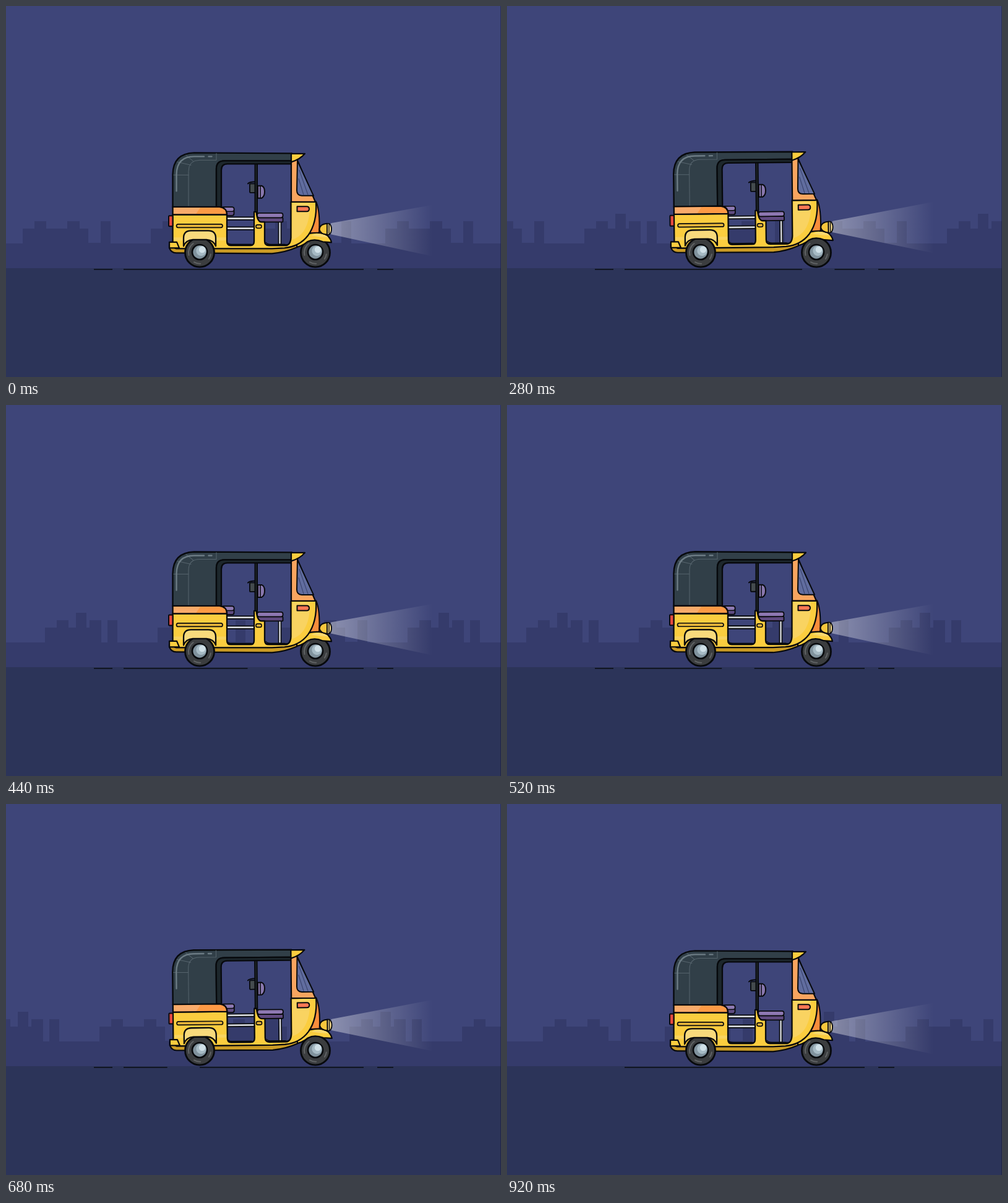
Animation, 800 px wide and 600 px high, one loop 0.96 s. Source, as an HTML page with a canvas:

```html
<!DOCTYPE html>
<html lang="en">
<head>
<meta charset="utf-8">
<title>Night rickshaw</title>
<style>
html, body { margin: 0; width: 100%; height: 100%; overflow: hidden; background: #3e4579; }
canvas { display: block; }
</style>
</head>
<body>
<canvas id="stage" width="800" height="600"></canvas>
<script>
const ctx = document.getElementById('stage').getContext('2d');
const LOOP = 960, STEP = 40, SWING = 500;
const INK = '#07090c', YELLOW = '#fbcd3f', PALE = '#f8da7c', ORANGE = '#fd9a45';
const CITY_PERIOD = 586;

// Blocks as [x, width, top], relative to the start of each cluster.
const wideCluster = [[0, 106, 360], [19, 19, 348], [72, 20, 348], [106, 20, 383], [126, 16, 348]];
const tallCluster = [[0, 91, 360], [19, 19, 348], [50, 17, 336], [72, 19, 348], [101, 16, 348]];
const clusters = [[27, wideCluster], [234, tallCluster], [416, wideCluster]];

function shape(d, fill, line = 0, ink = INK) {
  const path = new Path2D(d);
  if (fill) { ctx.fillStyle = fill; ctx.fill(path); }
  if (line) { ctx.strokeStyle = ink; ctx.lineWidth = line; ctx.stroke(path); }
}

function box(x, y, w, h, r, fill, line = 0) {
  ctx.beginPath();
  ctx.roundRect(x, y, w, h, r);
  ctx.fillStyle = fill;
  ctx.fill();
  if (line) { ctx.strokeStyle = INK; ctx.lineWidth = line; ctx.stroke(); }
}

function disc(x, y, r, fill, line = 0) {
  ctx.beginPath();
  ctx.arc(x, y, r, 0, Math.PI * 2);
  ctx.fillStyle = fill;
  ctx.fill();
  if (line) { ctx.strokeStyle = INK; ctx.lineWidth = line; ctx.stroke(); }
}

function across(x0, x1, ...stops) {
  const g = ctx.createLinearGradient(x0, 0, x1, 0);
  for (const [at, color] of stops) g.addColorStop(at, color);
  return g;
}

function backdrop(t) {
  ctx.fillStyle = '#3e4579';
  ctx.fillRect(0, 0, 800, 600);
  ctx.fillStyle = '#353b6b';
  ctx.fillRect(0, 384, 800, 40);
  const shift = t * 0.3895;
  for (let copy = -1; copy < 3; copy++)
    for (const [start, blocks] of clusters)
      for (const [x, w, top] of blocks) {
        const left = Math.round(start + x + copy * CITY_PERIOD - shift);
        ctx.fillRect(left, top, w, 384 - top);
      }
  ctx.fillStyle = '#2c3459';
  ctx.fillRect(0, 424, 800, 176);
}

function road(t) {
  const gap = 628.4 - t * 0.5408, end = gap + 52.5;
  ctx.fillStyle = '#111623';
  for (const [a, b] of [[142, 172], [190, 578], [600, 626]]) {
    const left = Math.min(b, gap), right = Math.max(a, end);
    if (left > a) ctx.fillRect(a, 425, left - a, 2);
    if (right < b) ctx.fillRect(right, 425, b - right, 2);
  }
}

function wheel(x) {
  disc(x, 398.7, 23.5, '#3b3d3f', 2.8);
  ctx.strokeStyle = '#606365';
  ctx.lineWidth = 2;
  for (const [from, to] of [[2.9, 4.1], [1.5, 2.1], [0.15, 0.6]]) {
    ctx.beginPath();
    ctx.arc(x, 398.7, 18, from, to);
    ctx.stroke();
  }
  disc(x, 398, 12, '#80929d', 2.6);
  disc(x + 2.5, 396, 8.2, '#a6bac4');
  disc(x + 4, 394, 5.2, '#d0e0e7');
}

function beam() {
  const light = across(526, 689,
    [0, 'rgba(255,255,255,.4)'], [.5, 'rgba(255,255,255,.2)'], [1, 'rgba(255,255,255,0)']);
  shape('M525 351L689 321.5V404.5L525 369Z', light);
}

function interior() {
  box(348, 325, 20.5, 13.5, 3, '#604d83', 1.8);
  box(348, 325, 20.5, 7, 3, '#8e7ab3', 1.5);
  for (const y of [341, 357]) box(355, y, 48, 4.5, 0, '#d5d8dc', 1.8);
  box(440.5, 348, 4, 37, 0, '#d5d8dc', 1.6);
  box(406, 342, 41.5, 7, 1, '#604a80', 1.8);
  box(406, 334.5, 41.5, 7.5, 3, '#8e78b2', 1.8);
  shape('M407 290.5H413Q418 292 418 300T413 310.5H407Z', '#8978ae', 2);
  shape('M411 291V310', null, 1.5);
  box(394, 287, 9, 14.5, 1, '#444b4e', 1.8);
  shape('M391 287Q394 284 403 284', null, 2);
  box(402.5, 250, 3.5, 86, 0, '#252c30', 2);
}

function canopy() {
  shape('M269.5 325V272Q270 238 304 237L462 238V250H353Q340 250 340 263V325Z', '#313f48', 2.4);
  shape('M340 325V263Q340 250 353 250H462V255H358Q348 255 348 265V325Z', '#1d272c', 2.3);
  shape('M295 323V267Q295 249 313 249H340V238M271 273H295M277 252L299 257M291 241L303 251',
    null, 1, '#56646d');
  shape('M275.5 299V272Q276 243 304 243H320M327.5 243H332.5', null, 2.4, '#6c7b84');
}

function frontFender() {
  shape('M501 316Q508 331 506 367H486Q500 346 501 316Z', '#f88d3c', 2);
  shape('M484 370Q494 366 505 366.5Q523 368 526 382L512 381Q498 375 487 381' +
    'Q478 389 463 391Z', YELLOW, 2.2);
  shape('M493 371Q499 368 506 368Q517 369 521 374L507 373Z', '#f9d870');
  shape('M519 351.5Q507 352.5 506.5 361Q508 368.5 519 369.5Z', '#f7c63d', 2);
  shape('M519 351.5H522Q526 354 526 360.5T522 369.5H519Z', '#ffe290', 1.8);
  shape('M522 353V368', null, 1.4);
}

function bodywork() {
  shape('M264 391Q267 399 275 399L430 400Q452 398 470 390V386H264Z', '#cc9c25', 2.2);

  // Side panel, centre pillar and door share a single outline.
  const panel = 'M269.5 337H357V380Q357 387 363 387H395Q401 387 401 380V332.5H404.5' +
    'Q406 349 413 349H418V380Q418 387 425 387H452Q460 386 460.5 374V316.5H501' +
    'Q503 350 488 371Q474 389 450 391L430 392H275Q269.5 391 269.5 384Z';
  shape(panel, YELLOW);
  shape('M271 374H356V379H271Z', '#f9d45f');
  shape('M463 318.5H491Q492 347 481 364Q474 374 462 378Z', '#f9d361');
  shape(panel, null, 2.3);
  shape('M359 383Q360 385 365 385H396M420 382Q422 385 428 385H451', null, 1.2);
  box(404, 353.5, 9, 5.5, 2.5, '#e3b23a', 1.6);

  const sill = 'M269.5 324.5H345Q357 326 357 337H269.5Z';
  shape(sill, ORANGE);
  shape('M271 326H314L307 336H271Z', '#f9ab6b');
  shape(sill, null, 2.3);
  box(275.5, 352.5, 74.5, 5.5, 2.8, '#e7b63a', 1.7);
  box(263, 339, 6.5, 17, 1, '#e54b41', 2);
  shape('M264 381.5H276L280 391H264Z', YELLOW, 2.2);
}

function cab() {
  shape('M461 251L470 247L500 316.5H461Z', '#f9a55f', 2.2);
  shape('M471 250L497 306.5H478Q470 306 470 298Z', '#616d9f', 2);
  shape('M474 265L488 305M473 279L481 305', null, 1.2, '#3c4670');
  shape('M461 238.5H483Q475 248 461 252Z', YELLOW, 2.2);
  shape('M470.5 324H486Q490 324 490 328T486 332H470.5Z', '#fb7855', 2);
}

function rearFender() {
  shape('M287 388V375Q287 363 299 363H327Q339 363 339 375V388' +
    'Q335 378 324 377.5H302Q291 378 287 388Z', PALE, 2.3);
}

// The body pitches around its rear edge and heaves slightly; the wheels stay put.
function rocking(t, ...parts) {
  const turns = t / SWING;
  const lift = (1 - Math.cos(2 * Math.PI * (turns + 0.03))) / 2;
  ctx.save();
  ctx.translate(270, 300 + 0.45 * Math.cos(2 * Math.PI * (turns + 0.12)));
  ctx.rotate(-0.0122 * lift ** 1.55);
  ctx.translate(-270, -300);
  for (const draw of parts) draw();
  ctx.restore();
}

function render(t) {
  backdrop(t);
  road(t);
  ctx.lineJoin = ctx.lineCap = 'round';
  wheel(500);
  rocking(t, beam, interior, canopy, frontFender, bodywork, cab);
  wheel(313);
  rocking(t, rearFender);
  ctx.fillStyle = 'rgba(20,25,50,.5)';
  ctx.fillRect(799, 0, 1, 600);
}

function frame() {
  render(Math.floor(performance.now() % LOOP / STEP) * STEP);
  requestAnimationFrame(frame);
}
frame();
</script>
</body>
</html>
```
